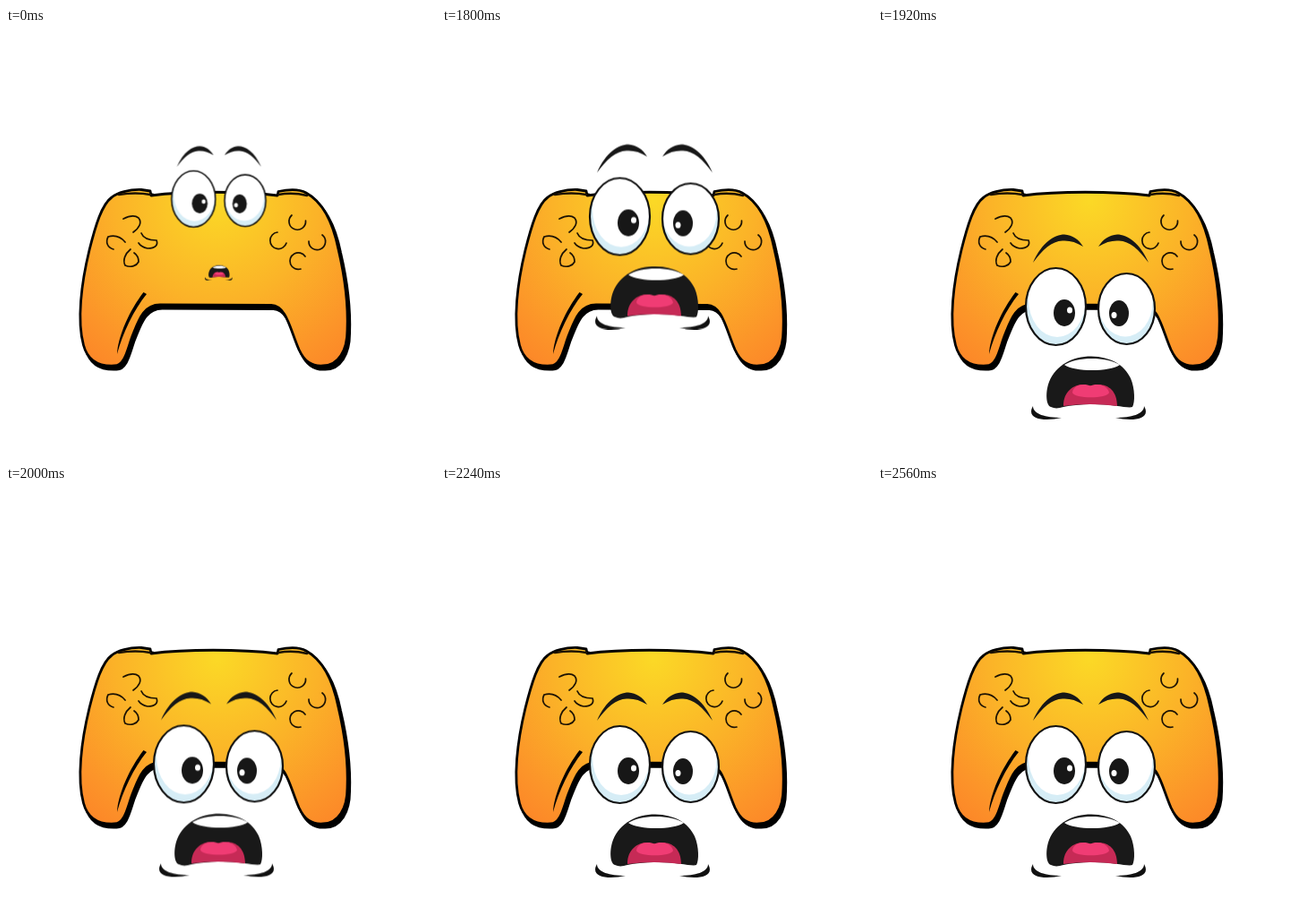
Recreate the animation shown at these times as an HTML page. Size 480x480 px, loop 2.88 s.

```html
<!DOCTYPE html>
<html lang="en">
<head>
<meta charset="utf-8">
<title>Surprised gamepad</title>
<style>
  html, body { margin: 0; width: 100%; height: 100%; overflow: hidden; background: #fff; }
  svg { display: block; width: 100vw; height: 100vh; }

  .face, .eyes, .mouth { animation: 2880ms infinite; }
  .face { animation-name: drop; }
  .eyes { animation-name: widen; transform-origin: 238.5px 228px; }
  .mouth { animation-name: gasp; transform-origin: 238px 275px; }

  /* Motion advances in 40 ms steps. */
  @keyframes widen {
    0% { transform: scale(.73); animation-timing-function: steps(4); }
    5.5556%, 100% { transform: none; }
  }
  @keyframes gasp {
    0% { transform: scale(.24); animation-timing-function: steps(4); }
    5.5556%, 100% { transform: none; }
  }
  @keyframes drop {
    0% { transform: translateY(0); animation-timing-function: steps(1); }
    61.1111% { transform: translateY(0); animation-timing-function: steps(4); }
    66.6667% { transform: translateY(134px); animation-timing-function: steps(1); }
    68.0556% { transform: translateY(140px); animation-timing-function: steps(3); }
    72.2222% { transform: translateY(120px); animation-timing-function: steps(4); }
    77.7778% { transform: translateY(134px); animation-timing-function: steps(4); }
    83.3333% { transform: translateY(131px); animation-timing-function: steps(4); }
    88.8889%, 100% { transform: translateY(134px); }
  }
</style>
</head>
<body>
<svg viewBox="0 0 480 480">
  <defs>
    <radialGradient id="skin" gradientUnits="userSpaceOnUse" cx="236" cy="192" r="225">
      <stop offset="0" stop-color="#fbd926"/>
      <stop offset=".5" stop-color="#fbb328"/>
      <stop offset=".85" stop-color="#fc9429"/>
      <stop offset="1" stop-color="#fc8828"/>
    </radialGradient>
    <path id="body" d="M118 189 C124 184 138 180 151 180.5 L161 182 L162 187
      C200 182 262 182 303 187 L304 182.5 C316 180 328 180 335 184
      C357 196 366 222 371 247 C379 281 382 312 381 337
      C381 360 371 377 354 377 C341 378 333 372 327 359
      C317 336 313 310 296 309.5 L172 309 C153 309 148 327 141 344
      C136 357 133 377 121 377 C103 378 91 371 86.5 354
      C79 327 84 285 93 248 C100 220 107 197 118 189Z"/>
    <path id="brow" d="M173 128 C183 105 197 96.5 208 96.5 C217 97 224 102 229 110
      C221 105 214 103 206 103.5 C194 104 184 113 173 128Z"/>
    <path id="chin" d="M173 288 C173 297 187 301 205 301 C188 305 164 304 173 288Z"/>
    <clipPath id="leftEye"><ellipse cx="198.5" cy="177" rx="33.5" ry="43"/></clipPath>
    <clipPath id="rightEye"><ellipse cx="277.5" cy="179.5" rx="31.5" ry="39.5"/></clipPath>
  </defs>

  <use href="#body" x="2.5" y="4" stroke="#000" stroke-width="3"/>
  <use href="#body" fill="url(#skin)" stroke="#000" stroke-width="2.8" stroke-linejoin="round"/>

  <g fill="none" stroke="#1c1204" stroke-width="1.7" stroke-linecap="round">
    <path stroke-width="2.6" d="M126 186 Q145 183 161 186 M304 186 Q320 183 336 187"/>
    <path d="M131 213 C137 210 144 209 148 212 C152 217 149 223 142 228"/>
    <path d="M133 239 C128 233 121 231 114 233 C111 239 113 245 120 247"/>
    <path d="M151 229 C153 234 158 237 168 237 C170 242 167 246 158 246 C153 245 150 243 148 240"/>
    <path d="M139 247 C133 252 130 259 133 265 C140 268 146 265 148 261 C148 257 146 253 143 251"/>
    <path d="M319 209 A9.3 9.3 0 1 0 334.5 215"/>
    <path d="M303 228 A9.3 9.3 0 1 0 313 240"/>
    <path d="M338 238 A9.3 9.3 0 1 0 353 231"/>
    <path d="M329 269 A9.3 9.3 0 1 1 334 255"/>
  </g>
  <path d="M157 297 C143 314 130 341 124 364 C125 344 138 315 153.5 295Z"/>

  <g class="face">
    <g class="eyes">
      <g fill="#171717">
        <use href="#brow"/>
        <use href="#brow" transform="translate(475) scale(-1 1)"/>
      </g>

      <g clip-path="url(#leftEye)">
        <path fill="#d6edf6" d="M160 130H240V225H160Z"/>
        <ellipse cx="200" cy="169" rx="32" ry="42" fill="#fff"/>
      </g>
      <ellipse cx="198.5" cy="177" rx="33.5" ry="43" fill="none" stroke="#111" stroke-width="2.2"/>
      <ellipse cx="208" cy="184" rx="12" ry="15" fill="#171717"/>
      <ellipse cx="214" cy="181" rx="3" ry="3.5" fill="#fff"/>

      <g clip-path="url(#rightEye)">
        <path fill="#d6edf6" d="M240 130H315V225H240Z"/>
        <ellipse cx="276" cy="172" rx="30.5" ry="38.5" fill="#fff"/>
      </g>
      <ellipse cx="277.5" cy="179.5" rx="31.5" ry="39.5" fill="none" stroke="#111" stroke-width="2.2"/>
      <ellipse cx="269" cy="184.5" rx="11" ry="14.5" fill="#171717"/>
      <ellipse cx="263.5" cy="186.5" rx="3" ry="3.5" fill="#fff"/>
    </g>

    <g class="mouth">
      <g fill="#111">
        <use href="#chin"/>
        <use href="#chin" transform="translate(470) scale(-1 1)"/>
      </g>
      <path fill="#191919" d="M193 289 C187 287 187 271 191 261 C199 242 217 232.5 238 232.5
        C260 233 275 242 282 257 C287 269 287 284 284 289 C280 291 262 286 242 286
        C224 286 210 288 203 290 C198 291 196 290 193 289Z"/>
      <path fill="#fff" d="M208 242 C222 232.5 255 232.5 270 242 C258 250 220 250 208 242Z"/>
      <path fill="#c62a56" d="M207 288 C207 271 219 264 229 264 Q237 266 246 264
        C258 264 267 272 267 288 Q237 284 207 288Z"/>
      <path fill="#f03c74" d="M217 273 C218 264 231 262 237 266 C243 262 256 264 258 273
        C256 280 219 280 217 273Z"/>
    </g>
  </g>
</svg>
</body>
</html>
```
